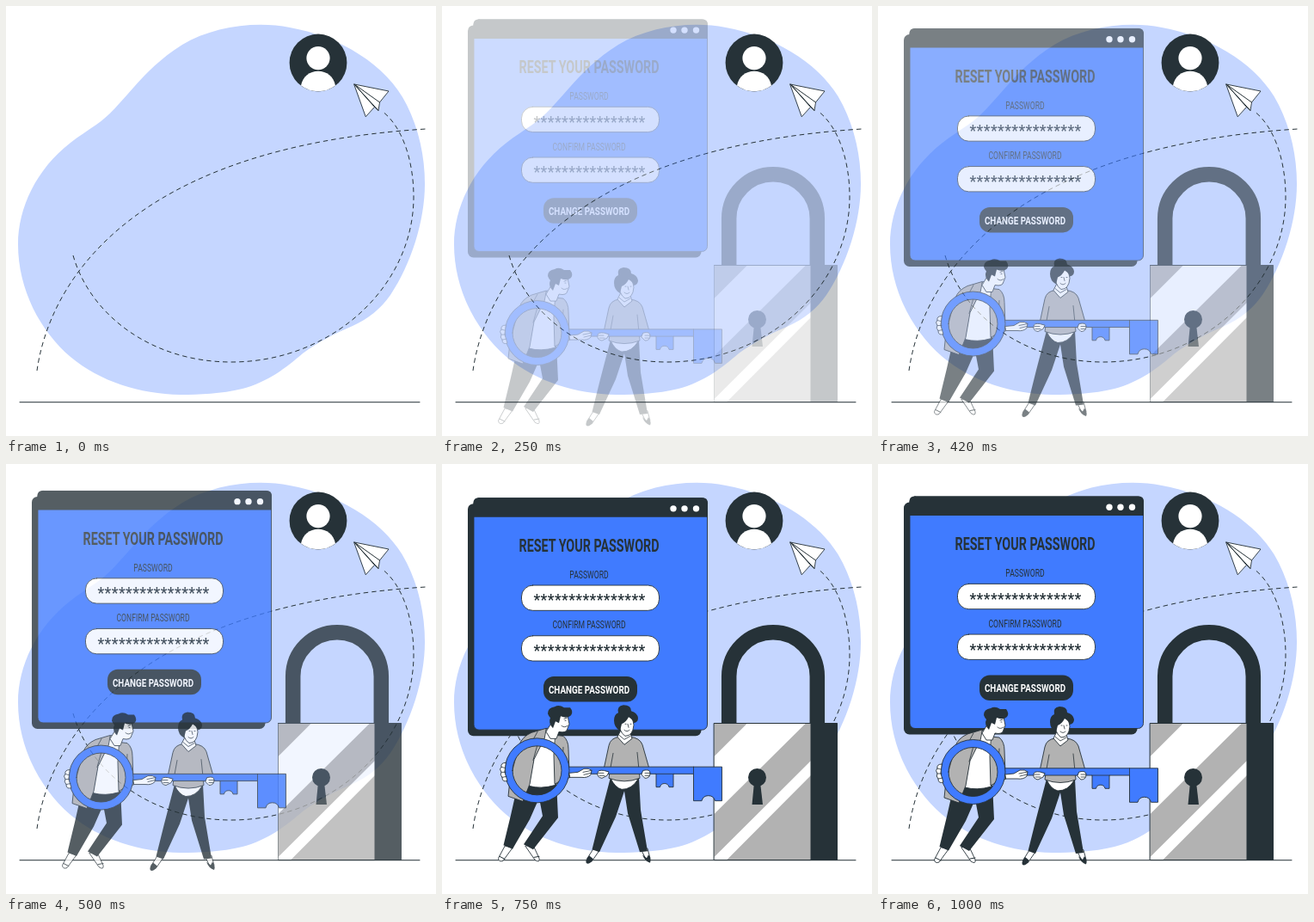
An HTML page that plays this animation: 500x500 px, repeating every 1.04 s.

```html
<!DOCTYPE html>
<html lang="en">
<head>
<meta charset="utf-8">
<title>Reset your password</title>
<style>
  html, body { margin: 0; height: 100%; overflow: hidden; background: #fff; }
  svg { display: block; width: 100vw; height: 100vh; stroke-linejoin: round; stroke-linecap: round; }
  text { font-family: Roboto, "Open Sans", sans-serif; text-anchor: middle; fill: #263238; }
  .line { fill: none; stroke: #263238; }
  .dash { fill: none; stroke: #263238; stroke-dasharray: 5.5 4; stroke-linecap: butt; }
  .dark { fill: #263238; }
  .white, .grey, .blue { stroke: #263238; stroke-width: .9; }
  .white { fill: #fff; }
  .grey { fill: #b2b2b2; }
  .blue { fill: #407bff; }
  .label { font-size: 12px; }
  .stars { font-size: 17.5px; font-weight: 500; letter-spacing: .4px; }
</style>
</head>
<body>
<svg viewBox="0 0 500 500">
  <!-- Backdrop -->
  <path fill="#c5d6ff" d="M105 138C135 118 155 76 205 45C240 24 290 17 330 25C387 35 443 68 466 115C480 143 487 175 487 207C487 250 471 300 447 336C436 352 421 364 403 372C384 380 362 391 345 404C325 421 305 437 275 445C250 451 225 452 203 452C155 451 110 437 75 408C40 378 14 330 14 277C14 235 35 190 75 159C85 151 95 145 105 138Z"/>
  <path class="line" d="M16 460.7H481"/>
  <path class="dash" d="M36 424C50 325 140 165 488 143"/>
  <path class="dash" d="M78 290C98 360 170 414 262 414C380 414 474 325 474 222C474 180 461 140 437 122"/>

  <!-- Avatar and paper plane -->
  <circle class="dark" cx="363" cy="66" r="33.4"/>
  <circle fill="#fff" cx="363" cy="60.6" r="13.6"/>
  <path fill="#fff" d="M343 92.500C345 82 353 75.800 363 75.800C373 75.800 381 82 383 92.500A33 33 0 0 1 343 92.500Z"/>
  <path class="white" d="M405 91L445 99L434.500 112L433 121.500L428.500 117.500L418.500 128.500Z"/>
  <path class="line" d="M434.500 112L405 91L428.500 117.500M405 91L433 121.500"/>

  <!-- Browser window -->
  <g id="win">
    <rect class="dark" x="30" y="44.500" width="271.500" height="270" rx="6.500"/>
    <rect class="blue" x="37" y="38" width="271.500" height="269.500" rx="6"/>
    <path class="dark" d="M36.500 60V43.500Q36.500 37.500 42.500 37.500H303Q309 37.500 309 43.500V60Z"/>
    <g fill="#fff">
      <circle cx="269" cy="50.200" r="3.700"/>
      <circle cx="282" cy="50.200" r="3.700"/>
      <circle cx="295.500" cy="50.200" r="3.700"/>
    </g>
    <rect class="white" x="92.500" y="139.400" width="160" height="29.300" rx="13"/>
    <rect class="white" x="92.500" y="198.100" width="160" height="29.300" rx="13"/>
    <rect class="dark" x="118" y="245.400" width="109" height="29.500" rx="12"/>
    <text class="stars" x="171.600" y="162.800">****************</text>
    <text class="stars" x="171.600" y="221.500">****************</text>
    <!-- Condensed lettering -->
    <g transform="translate(171 0) scale(.72 1)">
      <text y="100.200" font-size="19.900" font-weight="700">RESET YOUR PASSWORD</text>
      <text class="label" y="131.500">PASSWORD</text>
      <text class="label" y="189.800">CONFIRM PASSWORD</text>
      <text y="265.300" font-size="13.700" font-weight="600" style="fill:#fff">CHANGE PASSWORD</text>
    </g>
  </g>

  <!-- Padlock -->
  <g id="lock">
    <path fill="none" stroke="#263238" stroke-width="17.500" stroke-linecap="butt" d="M333.700 302V247A51.300 51.300 0 0 1 436.300 247V302"/>
    <path fill="#b2b2b2" d="M316.500 301.500H429V460.500H316.500Z"/>
    <path fill="#fff" d="M355 301.500H423L316.500 407V340ZM429 345V362L331 460.500H316.500V457Z"/>
    <path class="dark" d="M428.500 301.500H460V460.500H428.500Z"/>
    <path class="line" d="M316.500 301.500H459.500V460.500H316.500Z"/>
    <circle class="dark" cx="366.500" cy="364.500" r="10.500"/>
    <path class="dark" d="M363 370H370L373 396H360.500Z"/>
  </g>

  <!-- People with the key -->
  <g id="team">
    <!-- Woman -->
    <path class="white" d="M176 449L168.500 461L174 464L183 451ZM231 449L237 461L242 460L239 449Z"/>
    <path class="dark" d="M171 457Q166 463 168 466Q172 468 176 461ZM233 456Q236 464 242 465.500Q244 461 240 456L238 460Z"/>
    <path class="dark" d="M196 366L184 412L174.500 450L183 453L202 412L212 382L216 408L230 453L239 452L231 404L229 366Z"/>
    <path class="white" d="M196 367Q201 378 209 380Q221 380 228 368Z"/>
    <path class="grey" d="M206 319Q196 320 194 329L188 357L195 360L194 367Q212 374 230 367L229 357L234 359L241 356L233 328Q230 320 219 319Z"/>
    <path class="line" stroke-width=".8" d="M195 360L199 338M229 357L227 337"/>
    <path class="white" d="M208 311L204 319L212 328L221 321L218 311Z"/>
    <path class="line" stroke-width=".8" d="M206 317L212 322L219 318"/>
    <path class="white" d="M206 299Q205 313 213 318Q222 318 223 305L221 295H209Z"/>
    <path class="dark" d="M205 291Q203 283 211 282Q220 282 220 289Q227 291 228 297Q228 302 223 303Q222 299 217 296Q214 302 209 304L207 312Q200 308 200 300Q200 293 205 291Z"/>
    <path class="line" stroke-width=".8" d="M213 304h1M219 304h1M216 304L217 308M212 311Q215 314 218 311"/>

    <!-- Man -->
    <path class="white" d="M73 446L65.500 460Q66 465 71 463L82 448ZM97 446L108 462Q114 466 113 460L106 445Z"/>
    <path class="line" d="M67 458L73 461M107 459L113 458"/>
    <path class="dark" d="M89 370L80 410L71.500 445L82 449.500L102 415L113 390L117 411L95 444L106 450L135 413L133 371Z"/>
    <path class="white" d="M122 309L110 325L101 376Q115 380 132 375L133 319Z"/>
    <path class="grey" d="M121 309L104 314Q93 319 90 328L76 349L71 362L79 369L77 388L94 394L102 374L107 345L119 321Z"/>
    <path class="grey" d="M132 317L141 318Q147 323 147 333L148 359L149 366L136 371L131 374L130 340Z"/>
    <path class="line" stroke-width=".8" d="M111 313L105 324L111 328L106 346M86 342L79 369M141 331L140 358"/>
    <path class="white" d="M127 303L121 313L126 321L133 321L136 313Q145 315 146 309L148 304L146 294H133Z"/>
    <path class="dark" d="M123 292Q123 285 131 284Q136 281 142 285H149Q153 290 150 294Q146 298 138 295L136 303L132 301L129 309Q123 303 126 297Q124 295 123 292Z"/>
    <path class="line" stroke-width=".8" d="M143 300h1M142 298l3 -1M139 306Q142 309 146 306"/>

    <!-- Key -->
    <path class="blue" d="M146 353.800H325.500V393.300H317.500A8 8 0 0 0 302 393.300H292.500V362H269V377.300H264A5.400 5.400 0 0 0 253.500 377.300H249V362H146Z"/>
    <path class="line" stroke-width=".8" d="M249 362H269M292.500 362V353.800"/>
    <path class="blue" fill-rule="evenodd" d="M73 358a37.500 37.500 0 1 0 75 0a37.500 37.500 0 1 0 -75 0ZM82 358a28.500 28.500 0 1 0 57 0a28.500 28.500 0 1 0 -57 0Z"/>

    <!-- Hands -->
    <path class="white" d="M74 349Q68 349 69 354Q66 356 69 360Q67 363 70 366Q70 372 76 370L73 360Z"/>
    <path class="line" stroke-width=".8" d="M69 354L73 355M69 360L74 360M70 366L75 365"/>
    <path class="white" d="M148 361L158 360L165 356Q171 355 174 358L173 363Q169 367 162 366L149 366Z"/>
    <path class="line" stroke-width=".8" d="M164 360L174 358M165 363L173 361"/>
    <path class="white" d="M188 358Q181 357 181 361Q180 366 186 367L192 364L194 360Z"/>
    <path class="line" stroke-width=".8" d="M182 361H188M183 364H189"/>
    <path class="white" d="M234 358Q242 356 242 361Q242 367 236 367L232 363Z"/>
    <path class="line" stroke-width=".8" d="M236 361H242M236 364H241"/>
  </g>
</svg>
<script>
const LOOP = 1040, FPS = 24, LEAD = .02, SHIFT = 30;
const [win, lock, team] = ["win", "lock", "team"].map(id => document.getElementById(id));

const bezier = (a, b, s) => 3 * a * s * (1 - s) ** 2 + 3 * b * s * s * (1 - s) + s ** 3;

// Overshooting ease, like cubic-bezier(.36, -.01, .5, 1.38)
function ease(x) {
  if (x >= 1) return 1;
  let lo = 0, hi = 1;
  for (let i = 0; i < 30; i++) {
    const mid = (lo + hi) / 2;
    if (bezier(.36, .5, mid) < x) lo = mid; else hi = mid;
  }
  return bezier(-.01, 1.38, lo);
}

function draw(now) {
  const step = Math.floor((now % LOOP + 4) * FPS / 1000);
  const p = ease(step / FPS + LEAD);
  const opacity = step < 3 ? 0 : Math.min(1, p);
  const dy = SHIFT * (1 - p);
  for (const part of [win, lock, team]) part.setAttribute("opacity", opacity);
  win.setAttribute("transform", `translate(0 ${-dy})`);
  team.setAttribute("transform", `translate(0 ${dy})`);
}

const start = performance.now();
function tick() {
  draw(performance.now() - start);
  requestAnimationFrame(tick);
}
tick();
</script>
</body>
</html>
```
